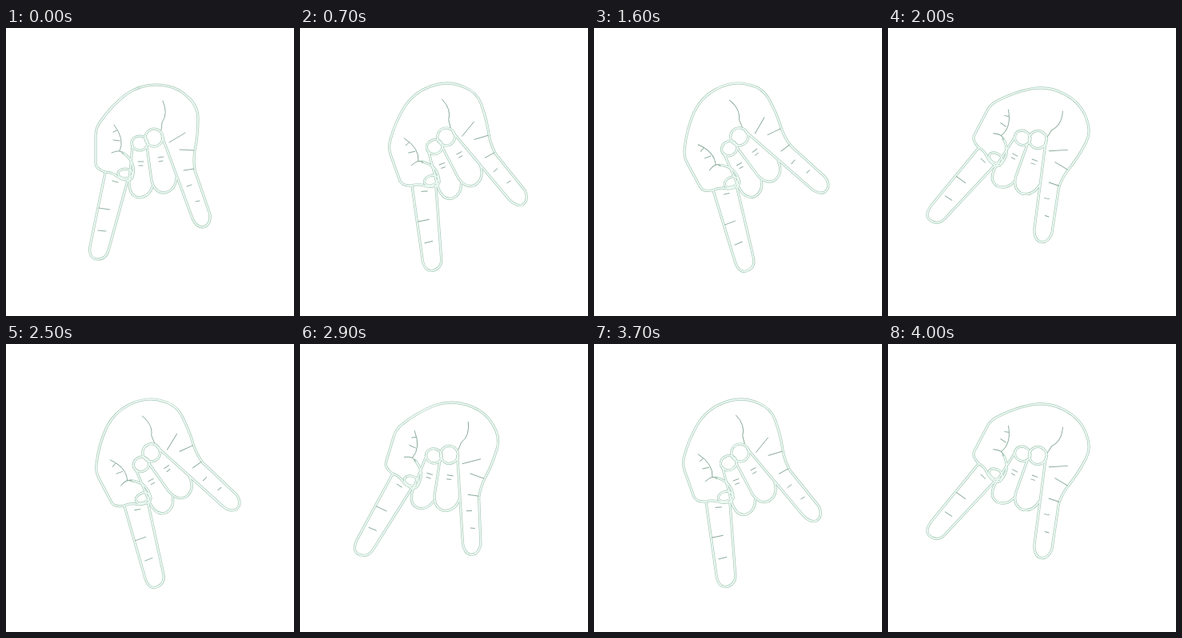
Write an HTML page that moves like this. It is 360 by 360 pixels and loops after 4100 ms.

```html
<!DOCTYPE html>
<html lang="en">
<head>
<meta charset="utf-8">
<title>Waving hand sign</title>
<style>
  html, body { margin: 0; width: 100%; height: 100%; overflow: hidden; background: #fff; }
  svg { display: block; width: 360px; height: 360px; }
  g { fill: none; stroke-linecap: round; stroke-linejoin: round; }
  .edge { stroke: #a6c8b7; stroke-width: 3.1; }
  .core { stroke: #f0fbf6; stroke-width: 1.7; }
  .crease { stroke: #86a897; stroke-width: 0.9; }
</style>
</head>
<body>
<svg viewBox="0 0 360 360">
  <defs>
    <g id="outline">
      <!-- palm -->
      <path d="M137 184Q131 180 124 180Q112 176 112 169V135Q112 125 118 117Q131 98 150 83Q167 71 187 71Q212 71 227 86Q240 97 240 113Q240 135 236 153Q234 166 236 178"/>
      <!-- extended fingers -->
      <path d="M124 181L105 273Q103 289 115 289Q125 289 128 278L152 191"/>
      <path d="M195 135L233 238Q238 249 246 249Q256 247 255 233L236 178"/>
      <!-- folded fingers -->
      <path d="M158 147L154 193Q154 211 167 212Q179 211 183 198"/>
      <path d="M176 148L182 191Q186 206 198 206Q212 203 213 187"/>
      <ellipse cx="167" cy="144" rx="10" ry="9"/>
      <circle cx="185" cy="137" r="11"/>
      <!-- thumb -->
      <path d="M146 156C157 163 162 173 158 187Q155 191 150 190Q142 189 137 184"/>
      <ellipse cx="149" cy="182" rx="9" ry="6"/>
    </g>
  </defs>
  <g id="hand">
    <use href="#outline" class="edge"/>
    <use href="#outline" class="core"/>
    <path class="crease" d="M135 121Q149 139 142 154M134 130L139 128M134 140L142 141M132 156Q143 151 147 157
      M196 91Q203 107 195 118L194 128M204 143L224 131M217 152L235 153M222 178L235 176
      M133 191L140 193M116 225L130 227M115 253L125 254
      M165 167H172M166 172H171M190 162L197 161M191 167L196 166
      M226 198L232 196M237 217L242 216"/>
  </g>
</svg>
<script>
  const LOOP = 4100, STEP = 100;
  const SWING = 29.6, FIRST_TURN = 0.56, HALF_SWING = 0.5;
  const hand = document.getElementById('hand');

  function easeInOut(x) {
    const a = x ** 1.7, b = (1 - x) ** 1.7;
    return a / (a + b);
  }

  // Turn once out of the rest pose, then swing from side to side.
  function angleAt(t) {
    if (t < FIRST_TURN) return -SWING * easeInOut(t / FIRST_TURN);
    const swings = (t - FIRST_TURN) / HALF_SWING;
    const side = Math.floor(swings) % 2 ? 1 : -1;
    return side * SWING * (1 - 2 * easeInOut(swings % 1));
  }

  function draw() {
    const t = Math.floor(performance.now() % LOOP / STEP) * STEP / 1000;
    hand.setAttribute('transform', `rotate(${angleAt(t).toFixed(3)} 181 143)`);
    requestAnimationFrame(draw);
  }
  draw();
</script>
</body>
</html>
```
